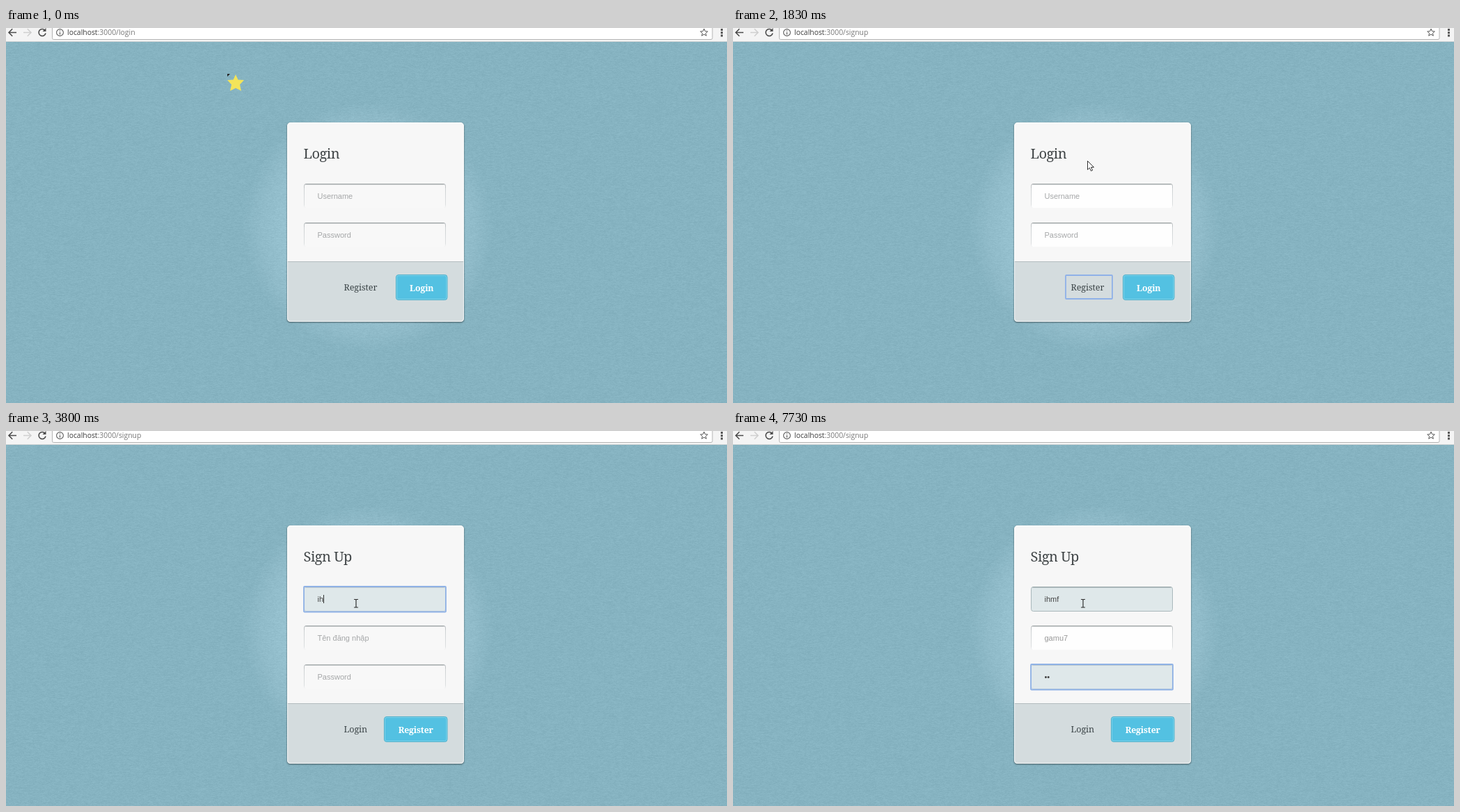
Animation, 1036 px wide and 540 px high, one loop 8000 ms. Source, as an HTML page with a canvas:

```html
<!DOCTYPE html>
<html lang="en">
<head>
<meta charset="utf-8">
<title>Login and sign up</title>
<style>
html, body { margin: 0; width: 100%; height: 100%; overflow: hidden; background: #86b3c1; }
canvas, svg { position: absolute; left: 0; top: 0; display: block; }
text { white-space: pre; }
.url { font: 10.4px "Open Sans", "Noto Sans", sans-serif; fill: #777; }
.title { font: 500 20px "Noto Serif", serif; letter-spacing: -.5px; fill: #3f4446; }
.link { font: 500 12.6px "Noto Serif", serif; letter-spacing: -.1px; fill: #3d4649; }
.btn { font: 600 12.4px "Noto Serif", serif; letter-spacing: -.2px; fill: #fff; text-anchor: middle; }
.entry { font: 11px "Liberation Sans", Arial, sans-serif; }
.card { filter: drop-shadow(0 1px 1px rgba(0, 0, 0, .5)); }
</style>
</head>
<body>
<canvas id="paper" width="1036" height="540"></canvas>
<svg width="1036" height="540" viewBox="0 0 1036 540">
  <defs>
    <linearGradient id="fade" x1="0" y1="0" x2="0" y2="1">
      <stop offset="0" stop-color="#a6abad"/>
      <stop offset=".2" stop-color="#cdd1d3"/>
      <stop offset=".85" stop-color="#dcdfe0"/>
      <stop offset="1" stop-color="#f7f7f7"/>
    </linearGradient>
  </defs>

  <g id="toolbar">
    <rect width="1036" height="20" fill="#f4f4f4"/>
    <rect y="19" width="1036" height="1" fill="#d0d4d5"/>
    <path d="M66.5-4V14.5q0 2 2 2H1013q2 0 2-2V-4" fill="#fff" stroke="#b4b4b4"/>
    <g fill="none" stroke="#4c4c4c" stroke-width="1.6">
      <path d="M15 6.5H4M9.2 1.3 4 6.5l5.2 5.2"/>
      <path d="M25 6.5h11M30.8 1.3 36 6.5l-5.2 5.2" stroke="#cfcfcf"/>
      <path d="M56 3.3A5 5 0 1 0 57 7.5"/>
      <path d="M57.5 0v5h-5z" fill="#4c4c4c" stroke="none"/>
      <circle cx="77.5" cy="6.5" r="4.9" stroke="#5c5c5c" stroke-width="1.1"/>
      <path d="M77.5 6v3.4M77.5 3.4v1.4" stroke="#5c5c5c" stroke-width="1.2"/>
      <path d="m1003 1.2 1.5 3.5 3.8.3-2.9 2.5.9 3.7-3.3-2-3.3 2 .9-3.7-2.9-2.5 3.8-.3z" stroke="#555" stroke-width="1"/>
    </g>
    <path d="M1027 1h3v3h-3zm0 4.200h3v3h-3zm0 4.200h3v3h-3z" fill="#555"/>
    <text class="url" x="88" y="10"><tspan fill="#3c3c3c">localhost</tspan>:3000/<tspan id="route"></tspan></text>
  </g>

  <g class="card">
    <rect id="sheet" x="404" y="136" width="254" rx="5" fill="#f7f7f7"/>
    <path id="footer" fill="#d4dcde"/>
    <path d="M404 336.500h254" id="rule" stroke="#b3bcbf"/>
    <rect id="gloss" x="404.5" y="136.500" width="253" rx="4.500" fill="none" stroke="#fff" stroke-opacity=".75"/>
  </g>
  <text class="title" id="title" x="427.500" y="188"></text>
  <g id="fields"></g>
  <g id="actions">
    <rect id="linkRing" x="478" y="356" width="67" height="34" rx="1" fill="none" stroke="#8fb1e8" stroke-width="1.800"/>
    <text class="link" id="link" x="485.500" y="378"></text>
    <g id="button">
      <rect class="face" y="355.500" height="36" rx="3.500" fill="#53c1e2" stroke="#4baeca"/>
      <rect class="face" y="356.500" height="34" rx="2.500" fill="none" stroke="#7fd3ea" data-inset="1"/>
    </g>
    <text class="btn" id="buttonText" y="379"></text>
  </g>

  <g id="cursors">
    <g id="star">
      <path d="M0 0h4L0 4z" fill="#222"/>
      <path d="m12 1 3.500 7.500 8.500.5-6 6.500 2 9-8-4-8 4 2-9-6-6.500 8.500-.5z" fill="#f3e45a"/>
    </g>
    <path id="arrow" d="M.5.500v12.500l2.900-2.700 2 4.500 2.200-.9-2-4.400h3.900z" fill="#fff" stroke="#333"/>
    <path id="beam" d="M-3-5.500h2.300l.7.700.7-.7H3M0-5v10.500M-3 6h2.300l.7-.7.7.7H3" fill="none" stroke="#333" stroke-width="1.200"/>
    <path id="hand" d="M-1.500 8V-4.500q1.500-2 3 0V1l6 1.500q1.500.5 1.500 2v4L7 13H0l-5.500-7q.5-2 2-1z" fill="#fff" stroke="#333"/>
  </g>
</svg>

<script>
const LOOP = 8000;
const $ = id => document.getElementById(id);
const set = (el, attrs) => { for (const k in attrs) el.setAttribute(k, attrs[k]); };
const show = (el, on) => set(el, { visibility: on ? 'visible' : 'hidden' });

function paintPaper() {
  const c = $('paper').getContext('2d');
  c.fillStyle = '#86b3c1';
  c.fillRect(0, 0, 1036, 540);
  const glow = c.createRadialGradient(520, 287, 0, 520, 287, 180);
  glow.addColorStop(0, '#a2cdda');
  glow.addColorStop(.62, '#98c3d1');
  glow.addColorStop(.85, '#90bbc9');
  glow.addColorStop(1, '#86b3c1');
  c.fillStyle = glow;
  c.fillRect(340, 107, 360, 360);
  // short horizontal fibres
  const img = c.getImageData(0, 0, 1036, 540);
  let seed = 7, grain = 0;
  for (let i = 0; i < img.data.length; i += 4) {
    seed = (seed * 1664525 + 1013904223) >>> 0;
    grain = grain * .5 + (seed / 4294967296 - .5) * 8;
    for (let k = 0; k < 3; k++) img.data[i + k] += grain;
  }
  c.putImageData(img, 0, 0);
}

const LOOKS = {
  idle:  { fill: '#f8f8f8', edge: 'url(#fade)', top: '#aeb3b5' },
  white: { fill: '#fefefe', edge: 'url(#fade)', top: '#aeb3b5' },
  tint:  { fill: '#dfe8ea', edge: '#a9b8bc', top: '#9eabae' },
  soft:  { fill: '#dfe8ea', edge: '#c0cfd3', top: '#b3c3c8' },
  early: { fill: '#e3ecee', edge: '#c3cdd0', top: '#b5c0c3', ring: '#858b8d' },
  pale:  { fill: '#fefefe', edge: '#d4d4d4', top: '#c4c4c4', ring: '#a4a4a4' },
  focus: { fill: '#dfe8ea', edge: '#c2cfd6', top: '#b3c0c6', ring: '#8fb2e6' }
};

const PAGES = {
  login:  { title: 'Login', link: 'Register', button: 'Login', left: 560, height: 287,
            hints: ['Username', 'Password'] },
  signup: { title: 'Sign Up', link: 'Login', button: 'Register', left: 543, height: 343,
            hints: ['Họ Tên', 'Tên đăng nhập', 'Password'] }
};
const WORDS = ['ihmf', 'gamu7', '••'];

// each step overrides part of the state before it
const STEPS = [
  [0, { page: 'login', route: 'login', cur: ['star', 318, 66], looks: ['idle', 'idle'],
        typed: [0, 0, 0], caret: -1, ring: false, dim: false }],
  [150, { cur: ['star', 322, 112] }],
  [290, { cur: ['star', 345, 180] }],
  [440, { cur: ['star', 378, 232] }],
  [580, { cur: ['beam', 533, 243], looks: ['early', 'idle'], caret: 0 }],
  [700, { cur: ['beam', 533, 250], looks: ['focus', 'idle'] }],
  [840, { cur: ['arrow', 529, 265] }],
  [990, { cur: ['beam', 524, 300], looks: ['focus', 'tint'] }],
  [1130, { cur: ['arrow', 517, 346], looks: ['focus', 'idle'], caret: -1 }],
  [1270, { cur: ['hand', 512, 370] }],
  [1410, { looks: ['idle', 'idle'], ring: true }],
  [1550, { route: 'signup' }],
  [1690, { cur: ['beam', 511, 298], looks: ['white', 'white'] }],
  [1830, { cur: ['arrow', 509, 191] }],
  [1970, { page: 'signup', looks: ['idle', 'idle', 'idle'], ring: false }],
  [2110, { cur: ['arrow', 506, 208] }],
  [2250, { cur: ['beam', 503, 248], looks: ['tint', 'idle', 'idle'] }],
  [2380, { looks: ['early', 'idle', 'idle'], caret: 0 }],
  [2520, { looks: ['focus', 'idle', 'idle'] }],
  [2660, { caret: -1 }],
  [2800, { caret: 0 }],
  [3110, { typed: [1, 0, 0] }],
  [3240, { typed: [2, 0, 0] }],
  [3650, { caret: -1 }],
  [3800, { caret: 0 }],
  [4080, { caret: -1 }],
  [4210, { typed: [3, 0, 0], caret: 0 }],
  [4610, { typed: [4, 0, 0] }],
  [4750, { caret: -1 }],
  [4890, { looks: ['soft', 'pale', 'idle'], caret: 1 }],
  [5030, { looks: ['tint', 'focus', 'idle'] }],
  [5560, { typed: [4, 1, 0], looks: ['tint', 'focus', 'white'] }],
  [5700, { typed: [4, 2, 0] }],
  [5830, { typed: [4, 3, 0] }],
  [5960, { typed: [4, 4, 0] }],
  [6100, { caret: -1 }],
  [6370, { typed: [4, 5, 0], caret: 1 }],
  [6630, { looks: ['tint', 'soft', 'pale'], caret: 2 }],
  [6770, { looks: ['tint', 'white', 'focus'], dim: true }],
  [7060, { caret: -1 }],
  [7480, { typed: [4, 5, 1], caret: 2 }],
  [7600, { typed: [4, 5, 2] }],
  [7730, { caret: -1 }]
];

function make(tag, attrs, parent) {
  const el = document.createElementNS('http://www.w3.org/2000/svg', tag);
  set(el, attrs);
  return parent.appendChild(el);
}

const fields = [0, 1, 2].map(i => {
  const g = make('g', { transform: `translate(428 ${224 + 56 * i})` }, $('fields'));
  return {
    g,
    box: make('rect', { x: .5, y: .5, width: 203, height: 35, rx: 3 }, g),
    top: make('path', { d: 'M2.500 1h199', 'stroke-width': 1.5 }, g),
    ring: make('rect', { x: 0, y: 0, width: 204, height: 36.5, rx: 1, fill: 'none', 'stroke-width': 1.8 }, g),
    text: make('text', { class: 'entry', x: 19.5, y: 22 }, g),
    caret: make('rect', { y: 12, width: 1, height: 12, fill: '#333' }, g)
  };
});

function drawPage(s) {
  const p = PAGES[s.page], h = p.height, shift = h - 287;
  set($('sheet'), { height: h });
  set($('gloss'), { height: h - 1 });
  set($('footer'), { d: `M404 ${336 + shift}h254v82q0 5-5 5h-244q-5 0-5-5z` });
  for (const id of ['rule', 'actions']) set($(id), { transform: `translate(0 ${shift})` });
  $('title').textContent = p.title;
  $('link').textContent = p.link;
  $('buttonText').textContent = p.button;
  set($('buttonText'), { x: (p.left + 634.5) / 2 });
  document.querySelectorAll('.face').forEach(el => {
    const inset = +(el.dataset.inset || 0);
    set(el, { x: p.left + .5 + inset, width: 633.5 - p.left - 2 * inset });
  });
  $('route').textContent = s.route;
  show($('linkRing'), s.ring);
}

function drawField(f, i, s) {
  const hint = PAGES[s.page].hints[i];
  f.g.style.display = hint ? '' : 'none';
  if (!hint) return;
  const look = LOOKS[s.looks[i]], word = WORDS[i].slice(0, s.typed[i]);
  set(f.box, { fill: look.fill, stroke: look.edge });
  set(f.top, { stroke: look.top });
  set(f.ring, { stroke: look.ring || 'none' });
  f.text.textContent = word || hint;
  set(f.text, { fill: !word ? '#a5a7a8' : i === 1 && s.dim ? '#999' : '#444' });
  show(f.caret, s.caret === i);
  set(f.caret, { x: 19 + (word ? Math.round(f.text.getComputedTextLength()) : 0) });
}

let last = -1;
function tick(now) {
  const t = now % LOOP;
  const past = STEPS.filter(step => step[0] <= t);
  if (past.length !== last) {
    last = past.length;
    const s = Object.assign({}, ...past.map(step => step[1]));
    drawPage(s);
    fields.forEach((f, i) => drawField(f, i, s));
    const [kind, x, y] = s.cur;
    for (const el of $('cursors').children) show(el, el.id === kind);
    set($(kind), { transform: `translate(${x} ${y})` });
  }
}

const start = performance.now();
function loop() {
  tick(performance.now() - start);
  requestAnimationFrame(loop);
}
paintPaper();
loop();
</script>
</body>
</html>
```
